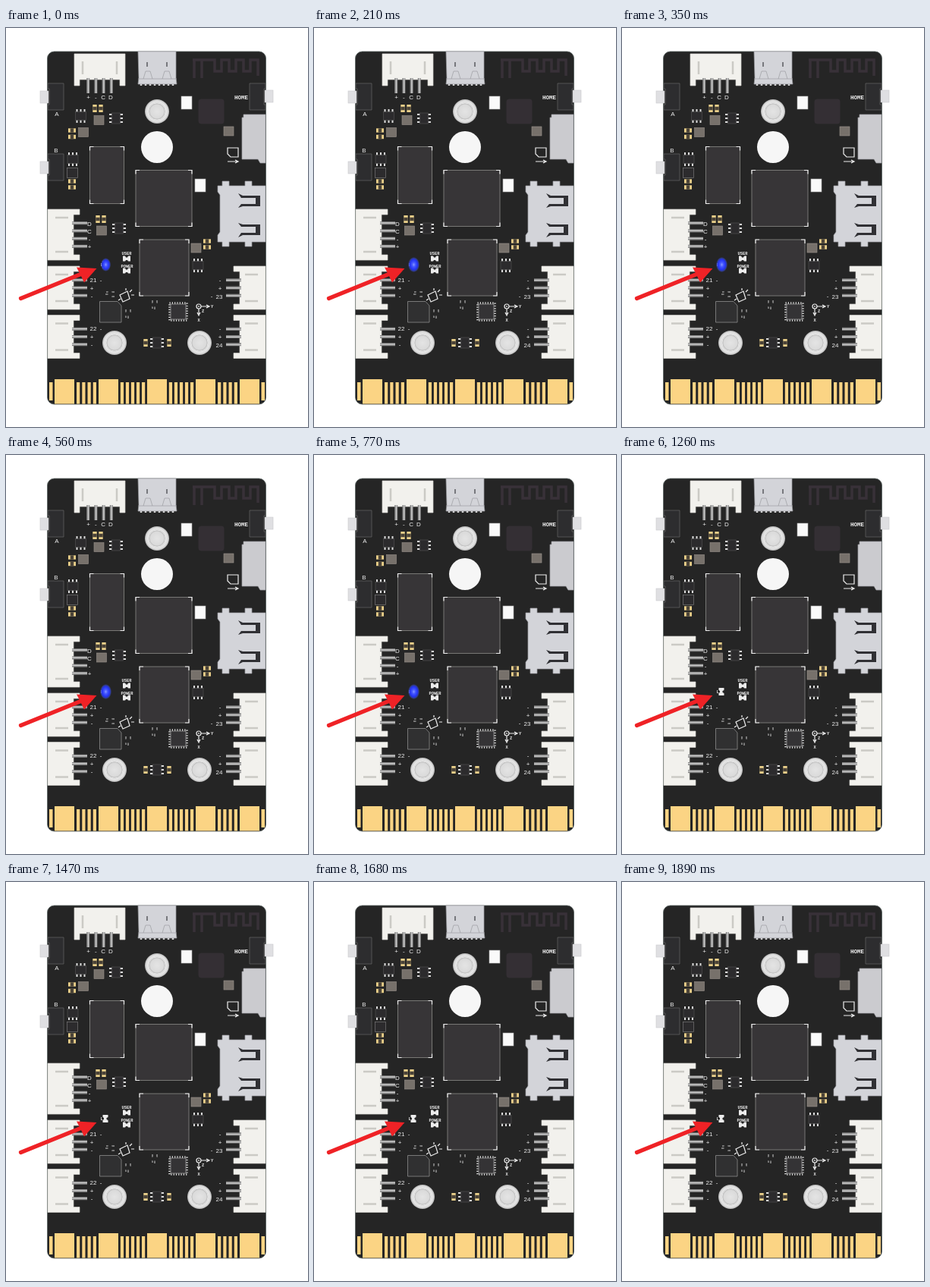
An HTML page for the animation above (1.96 s loop, 398 px wide and 526 px high).

```html
<!DOCTYPE html>
<html lang="en">
<head>
<meta charset="utf-8">
<title>Board with blinking LED</title>
<style>
html, body { margin: 0; height: 100%; overflow: hidden; background: #fff; }
svg { display: block; width: 100%; height: 100%; }
text { fill: #eee; font: 8px "Liberation Sans", Arial, sans-serif; text-anchor: middle; }
.mono { font: bold 5.4px "Liberation Mono", monospace; }
.line { fill: none; stroke: #eee; stroke-width: 1.2; }
</style>
</head>
<body>
<svg viewBox="0 0 398 526">
<defs>
  <radialGradient id="metal">
    <stop offset="0" stop-color="#e4e4e4"/><stop offset=".55" stop-color="#dadada"/>
    <stop offset=".66" stop-color="#b4b4b4"/><stop offset=".76" stop-color="#e9e9e9"/>
    <stop offset=".9" stop-color="#d8d8d8"/><stop offset="1" stop-color="#adadad"/>
  </radialGradient>
  <radialGradient id="glow">
    <stop offset="0" stop-color="#8798ff"/><stop offset=".3" stop-color="#4355ff"/>
    <stop offset=".65" stop-color="#2332f2"/><stop offset=".82" stop-color="#3446c8" stop-opacity=".7"/>
    <stop offset="1" stop-color="#3446a0" stop-opacity="0"/>
  </radialGradient>
  <g id="hole">
    <circle r="16" fill="url(#metal)"/>
    <circle r="11" fill="none" stroke="#f4f4f4" stroke-width=".8"/>
  </g>
  <g id="button">
    <rect x="-10" y="10" width="11" height="16" fill="#dfdfe2" stroke="#c9c9cd" stroke-width=".6"/>
    <path d="M0 0H21V35H0V28H2V7H0Z" fill="#2d2d2f" stroke="#666" stroke-width=".7"/>
  </g>
  <g id="cap">
    <rect x="-2.7" y="-5" width="5.4" height="10" fill="#ead08a"/>
    <rect x="-2.7" y="-2.2" width="5.4" height="4.4" fill="#4b4338"/>
  </g>
  <g id="ic">
    <path d="M-5-9V9M0-9V9M5-9V9" stroke="#ddd" stroke-width="2"/>
    <rect x="-7" y="-5.5" width="14" height="11" fill="#2c2b2d" stroke="#555" stroke-width=".6"/>
  </g>
  <g id="led">
    <path d="M-5-3.500H5V3.500H-5Z" fill="#ededе6"/>
    <path d="M-5-3.500H5V3.500H-5Z" fill="#ececе6"/>
  </g>
  <g id="lamp">
    <path d="M-5-3.500H-2L-1-1.500H1L2-3.500H5V3.500H2L1 2H-1L-2 3.500H-5Z" fill="#ececec"/>
  </g>
  <g id="sot">
    <path d="M-3-6V-2M3-6V-2M0 2V6M-3 2V5" stroke="#ccc"/>
    <rect x="-3.5" y="-2.5" width="7" height="5" fill="#252525"/>
  </g>
  <path id="slot" d="M306 218L312 221H335V235H312L306 237L310 232H329V224H310Z" fill="#303034"/>
</defs>

<rect x="54.5" y="31" width="288" height="465" rx="9" fill="#252525" stroke="#56605e" stroke-width=".8"/>
<g id="parts"></g>

<path d="M248 66V42M258 66V42M246 42H275V57H284V42H294V57H303V42H313V57H322V42H332V63" fill="none" stroke="#383138" stroke-width="3.5"/>
<rect x="253.500" y="93.500" width="34" height="33" rx="4" fill="#342f34"/>

<g fill="#d3d4d9" stroke="#9b9ca1" stroke-width=".7">
  <path d="M178 72V76M184 72V76M190 72V76M196 72V76M202 72V76M208 72V76M214 72V76M220 72V76" stroke="#ddd" stroke-width="2.500"/>
  <path d="M174 31H224V66L225 74H174L175 66Z"/>
  <path d="M174 67H225M181 67L184 57H190L193 67M206 67L209 57H215L218 67" fill="none"/>
  <path d="M186 45V51M212 45V51" stroke="#77787d" stroke-width="2"/>
  <path d="M313 114H342V178H335L332 173H311V118H313Z" fill="#cbcbcf"/>
  <path d="M285 202H294V208H315V202H324V208H342V282H324V288H315V282H294V288H285V282H279V273L282 269V220L279 216V208H285Z"/>
</g>
<use href="#slot"/>
<use href="#slot" transform="matrix(1 0 0 -1 0 494)"/>

<circle cx="199" cy="157" r="21" fill="#f6f6f6"/>

<g class="line">
  <path d="M292 158H306V170H296L292 166ZM292 176H305M302 174L306 176L302 178"/>
  <path d="M254 370V377M252 375L254 379L256 375M257 367H267M264 365L268 367L264 369"/>
  <circle cx="254" cy="367" r="3"/><circle cx="254" cy="367" r=".3"/>
  <path d="M150 352L160 347L163 357L154 361ZM151 357L148 359M163 348L166 345M165 352L169 352M158 346L158 343"/>
</g>

<path d="M123.500 360.500H147L152 366V388H123.500Z" fill="#303031" stroke="#8c8c8c" stroke-width=".8"/>
<rect x="215.500" y="362.500" width="23" height="23" fill="none" stroke="#ddd" stroke-width="2.500" stroke-dasharray="1.2 2.1"/>
<rect x="217" y="364" width="20" height="20" fill="#343335" stroke="#bbb" stroke-width=".6"/>

<g id="labels"></g>
<use href="#lamp" transform="translate(131 312) rotate(90)"/>
<ellipse id="light" cx="131.500" cy="312" fill="url(#glow)"/>

<g fill="#ef2226">
  <path d="M19.500 356.500L101 323.500" stroke="#ef2226" stroke-width="5.200" stroke-linecap="round"/>
  <path d="M119.500 317L93 315.500L98 325L103 335.500Z"/>
</g>
</svg>
<script>
const parts = document.getElementById("parts");
const labels = document.getElementById("labels");
document.getElementById("led").remove();
let art = "";
const rect = (x, y, w, h, fill, more = "") =>
  art += `<rect x="${x}" y="${y}" width="${w}" height="${h}" fill="${fill}" ${more}/>`;
const put = (id, x, y, turn = 0) =>
  art += `<use href="#${id}" transform="translate(${x} ${y}) rotate(${turn})"/>`;

// Socket with its back on the local y axis and its pins pointing right.
function socket(x, y, turn, pins) {
  const h = pins > 3 ? 33.5 : 28.5;
  art += `<g transform="translate(${x} ${y}) rotate(${turn})">
    <path d="M0 ${-h}H42V${7 - h}H34V${h - 7}H42V${h}H0Z" fill="#f2f1ed" stroke="#d0cfca" stroke-width=".7"/>
    <path d="M10 ${11 - h}H27M10 ${h - 11}H27" stroke="#cbcac5" stroke-width="2.5"/>`;
  for (let i = 0; i < pins; i++) {
    const py = (i - (pins - 1) / 2) * 10.2;
    rect(32, py - 2, 20, 4, "#858585");
    rect(32, py - 1, 20, 1.5, "#c8c8c8");
  }
  art += "</g>";
}

function chip(x, y, w, h) {
  rect(x, y, w, h, "#373537", 'stroke="#8a8b87" stroke-width=".8"');
  const r = x + w, b = y + h;
  art += `<path class="line" d="M${x} ${y + 5}V${y}H${x + 5}M${r - 5} ${y}H${r}V${y + 5}
    M${r} ${b - 5}V${b}H${r - 5}M${x + 5} ${b}H${x}V${b - 5}"/>`;
}

// Edge contacts: wide pads with groups of narrow ones evenly filling the gaps.
const gold = (x, w, y = 463, h = 32.5) => rect(x, y, w, h, "#fbd484");
const pads = [64, 122, 186, 250, 308];
pads.forEach((x, i) => {
  gold(x, 26);
  if (i === pads.length - 1) return;
  const room = pads[i + 1] - x - 26, n = Math.floor(room / 7);
  const gap = (room - n * 4.2) / (n + 1);
  for (let k = 0; k < n; k++) gold(x + 26 + gap + k * (4.2 + gap), 4.2, 467, 28.5);
});
gold(57, 4.5, 467, 24);
gold(336.5, 4.5, 467, 24);

socket(123.5, 34, 90, 4);
socket(55, 272.5, 0, 4);
socket(55, 342.5, 0, 3);
socket(55, 407, 0, 3);
socket(342, 342.5, 180, 3);
socket(342, 407, 180, 3);

put("button", 55, 73);
put("button", 55, 166);
put("button", 342, 108, 180);
for (const [x, y] of [[199, 110], [143, 415], [255, 415]]) put("hole", x, y);

chip(110.5, 156.5, 45, 75);
chip(171, 187.5, 74, 74);
chip(176, 279, 65, 74);

for (const [x, y] of [[231, 90], [249, 199]])
  rect(x, y, 14, 17, "#fafafa", 'stroke="#aaa" stroke-width=".6"');
for (const [x, y] of [[116, 115.5], [95.5, 131.5], [119.5, 261], [244, 284], [287, 130]])
  rect(x, y, 13, 12, "#77716b", 'stroke="#99938c" stroke-width=".6"');
rect(80.5, 184.5, 14, 13, "#2c2b2d", 'stroke="#777" stroke-width=".7"');

for (const [x, y] of [[117, 106], [125, 106], [121, 252], [129, 252], [184, 415], [215, 415]]) put("cap", x, y);
for (const [x, y] of [[87, 135], [87, 143.5], [87, 202], [87, 210], [265, 281], [265, 289]]) put("cap", x, y, 90);
for (const [x, y, turn] of [[98.5, 116, 0], [145, 119, 90], [88, 173, 0], [149, 264, 90], [253, 313, 0], [199, 415, 90]])
  put("ic", x, y, turn);
put("sot", 196, 365);
put("sot", 161, 377);
put("sot", 137, 351, 90);
put("lamp", 159, 304);
put("lamp", 159, 320);
parts.innerHTML = art;

const write = (s, x, y, more = "") =>
  labels.innerHTML += `<text x="${x}" y="${y}" ${more}>${s}</text>`;
const tiny = (s, x, y) => write(s, x, y, 'class="mono"');
[..."+-CD"].forEach((s, i) => write(s, 108.5 + i * 9.8, 94));
[..."DC-+"].forEach((s, i) => write(s, 110, 261 + i * 10));
for (const [y, n] of [[335, "21"], [399, "22"]]) {
  write(n, 115, y);
  write("-", 125, y);
  write("+", 113, y + 11);
  write("-", 113, y + 21);
  write("-", 282, y);
  write("+", 282, y + 11);
}
write("-", 271, 356);
write("23", 281, 357);
write("24", 281, 421);
write("A", 67, 116);
write("B", 66, 164);
write("HOME", 310, 94, 'class="mono" style="font-size:7.6px"');
tiny("USER", 159, 299);
tiny("POWER", 159.5, 316);
tiny("L", 126, 314);
tiny("Y", 271.5, 369);
tiny("Z", 259.5, 375);
tiny("X", 254, 387);

const LOOP = 1960, light = document.getElementById("light");
function draw(now) {
  const t = now % LOOP;
  const size = t >= LOOP / 2 ? 0 : t < 140 || t >= 910 ? 0.88 : 1;
  light.setAttribute("rx", 7.7 * size);
  light.setAttribute("ry", 10.2 * size);
}
const start = performance.now();
function tick() {
  draw(performance.now() - start);
  requestAnimationFrame(tick);
}
tick();
</script>
</body>
</html>
```
